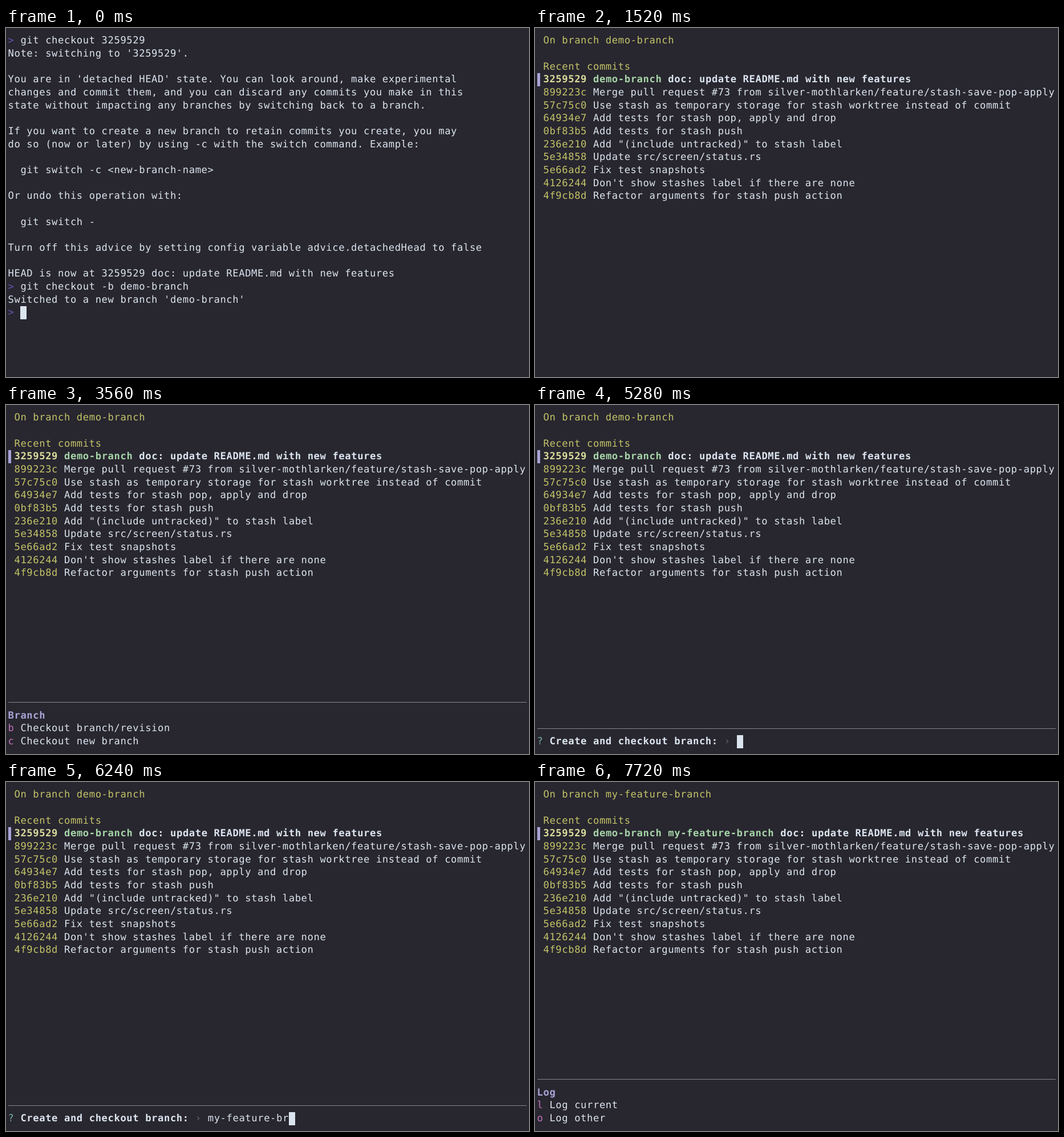
These frames come from a looping animation (917x611 px, 8 s). An HTML page:

```html
<!DOCTYPE html>
<html lang="en">
<head>
<meta charset="utf-8">
<title>Terminal: create a branch</title>
<style>
  html, body { margin: 0; width: 100%; height: 100%; overflow: hidden; background: #28262f; }
  #stage {
    position: relative; width: 917px; height: 611px; overflow: hidden;
    font: 17.2px/22.66px "DejaVu Sans Mono", monospace;
    letter-spacing: .59px; white-space: pre; color: #dbe5ef;
    text-rendering: geometricPrecision; font-variant-ligatures: none;
  }
  #stage span, #stage i { position: absolute; }
  .layer { visibility: hidden; }
  .layer.on { visibility: visible; }
  .p { color: #6658b4; }
  .y { color: #c3c468; }
  .g { color: #69bd78; }
  .m { color: #bd74bd; }
  .c { color: #72b3ad; }
  .d { color: #686771; }
  .W, .Y, .G, .H { font-weight: bold; }
  .Y { color: #dadb9b; }
  .G { color: #a6d5a8; }
  .H { color: #a8a4d6; }
  .bar { width: 5.4px; height: 22.66px; background: #a8a4d6; }
  .dim { background: #68658a; }
  .rule { width: 909px; height: 1px; background: #85838c; }
  .cursor { width: 10.945px; height: 22.66px; background: #dbe5ef; }
</style>
</head>
<body>
<div id="stage"></div>
<script>
const LOOP = 8000, CELL_W = 10.945, CELL_H = 22.66, LEFT = 3.5, TOP = 11.4;
const stage = document.getElementById('stage');
const layers = [];

function place(el, row, col) {
  el.style.left = LEFT + col * CELL_W + 'px';
  el.style.top = TOP + row * CELL_H + 'px';
}

function add(parent, tag, cls, row, col, text = '') {
  const el = document.createElement(tag);
  el.className = cls;
  el.textContent = text;
  place(el, row, col);
  parent.append(el);
  return el;
}

function layer(from, to, draw) {
  const el = document.createElement('div');
  el.className = 'layer';
  stage.append(el);
  layers.push({ el, from, to });
  draw(el);
}

// "~x" switches the colour class to x
function line(el, row, col, text) {
  const parts = ('~w' + text).split(/~(\w)/);
  for (let i = 1; i < parts.length; i += 2) {
    if (parts[i + 1]) add(el, 'span', parts[i], row, col, parts[i + 1]);
    col += parts[i + 1].length;
  }
}

function lines(el, row, col, list) {
  list.forEach((text, i) => line(el, row + i, col, text));
}

function rule(el, row) {
  add(el, 'i', 'rule', row + .46, 0);
}

layer(0, 1000, el => lines(el, 0, 0, [
  '~p>~w git checkout 3259529',
  "Note: switching to '3259529'.",
  '',
  "You are in 'detached HEAD' state. You can look around, make experimental",
  'changes and commit them, and you can discard any commits you make in this',
  'state without impacting any branches by switching back to a branch.',
  '',
  'If you want to create a new branch to retain commits you create, you may',
  'do so (now or later) by using -c with the switch command. Example:',
  '',
  '  git switch -c <new-branch-name>',
  '',
  'Or undo this operation with:',
  '',
  '  git switch -',
  '',
  'Turn off this advice by setting config variable advice.detachedHead to false',
  '',
  'HEAD is now at 3259529 doc: update README.md with new features',
  '~p>~w git checkout -b demo-branch',
  "Switched to a new branch 'demo-branch'",
  '~p>'
]));

layer(1040, LOOP, el => lines(el, 4, 1, [
  '~y899223c~w Merge pull request #73 from silver-mothlarken/feature/stash-save-pop-apply',
  '~y57c75c0~w Use stash as temporary storage for stash worktree instead of commit',
  '~y64934e7~w Add tests for stash pop, apply and drop',
  '~y0bf83b5~w Add tests for stash push',
  '~y236e210~w Add "(include untracked)" to stash label',
  '~y5e34858~w Update src/screen/status.rs',
  '~y5e66ad2~w Fix test snapshots',
  "~y4126244~w Don't show stashes label if there are none",
  '~y4f9cb8d~w Refactor arguments for stash push action'
]));

layer(1040, 1520, el => {
  line(el, 2, 1, '~YRecent commits');
  line(el, 3, 1, '~y3259529 ~gdemo-branch~w doc: update README.md with new features');
  for (let row = 2; row <= 12; row++) add(el, 'i', row > 2 ? 'bar dim' : 'bar', row, 0);
});

layer(1520, LOOP, el => {
  line(el, 2, 1, '~yRecent commits');
  add(el, 'i', 'bar', 3, 0);
});

layer(1040, 6880, el => line(el, 0, 1, '~yOn branch demo-branch'));

layer(1520, 6880, el =>
  line(el, 3, 1, '~Y3259529 ~Gdemo-branch~W doc: update README.md with new features'));

layer(6880, LOOP, el => {
  line(el, 0, 1, '~yOn branch my-feature-branch');
  line(el, 3, 1, '~Y3259529 ~Gdemo-branch my-feature-branch~W doc: update README.md with new features');
});

layer(1960, 3560, el => {
  rule(el, 14);
  lines(el, 15, 0, [
    '~HHelp',
    '~mg~w Refresh',
    '~mtab~w Toggle section',
    '~mk p ↑~w Move up',
    '~mj n ↓~w Move down',
    '~mC-k C-p C-↑~w Move up line',
    '~mC-j C-n C-↓~w Move down line',
    '~mC-u~w Half page up',
    '~mC-d~w Half page down',
    '~my~w Show refs'
  ]);
  lines(el, 15, 29, [
    '~HSubmenu', '~mh~w Help', '~mb~w Branch', '~mc~w Commit', '~mf~w Fetch', '~ml~w Log',
    '~mF~w Pull', '~mP~w Push', '~mr~w Rebase', '~mX~w Reset', '~mz~w Stash'
  ]);
  lines(el, 15, 42, ['~y3259529 ~gdemo-branch~w doc:', '~mret~w Show']);
});

layer(3560, 5280, el => {
  rule(el, 22);
  lines(el, 23, 0, ['~HBranch', '~mb~w Checkout branch/revision', '~mc~w Checkout new branch']);
});

layer(5280, 6840, el => {
  rule(el, 24);
  line(el, 25, 0, '~c?~W Create and checkout branch:~d ›');
});

layer(7680, LOOP, el => {
  rule(el, 22);
  line(el, 23, 0, '~HLog');
});

layer(7720, LOOP, el => lines(el, 24, 0, ['~ml~w Log current', '~mo~w Log other']));

const typed = add(stage, 'span', 'w', 0, 0);
const cursor = add(stage, 'i', 'cursor', 0, 0);

// Text being typed and where it starts, or null when no cursor shows
function inputAt(t) {
  if (t < 1000) {
    const n = t < 400 ? 0 : t < 440 ? 1 : t < 520 ? 2 : 4;
    return { row: 21, col: 2, text: 'gitu'.slice(0, n) };
  }
  if (t < 1040) return { row: 22, col: 0, text: '' };
  if (t >= 5280 && t < 6840) {
    const n = t < 5720 ? 0 : Math.floor((t - 5720) / 42.5) + 1;
    return { row: 25, col: 32, text: 'my-feature-branch'.slice(0, n) };
  }
  return null;
}

function render(now) {
  const t = Math.floor(now % LOOP / 40) * 40;
  for (const { el, from, to } of layers) el.classList.toggle('on', t >= from && t < to);
  const input = inputAt(t);
  typed.hidden = cursor.hidden = !input;
  if (input) {
    const { row, col, text } = input;
    typed.textContent = text;
    place(typed, row, col);
    place(cursor, row, col + text.length);
  }
}

const start = performance.now();
function tick() {
  render(performance.now() - start);
  requestAnimationFrame(tick);
}
tick();
</script>
</body>
</html>
```
